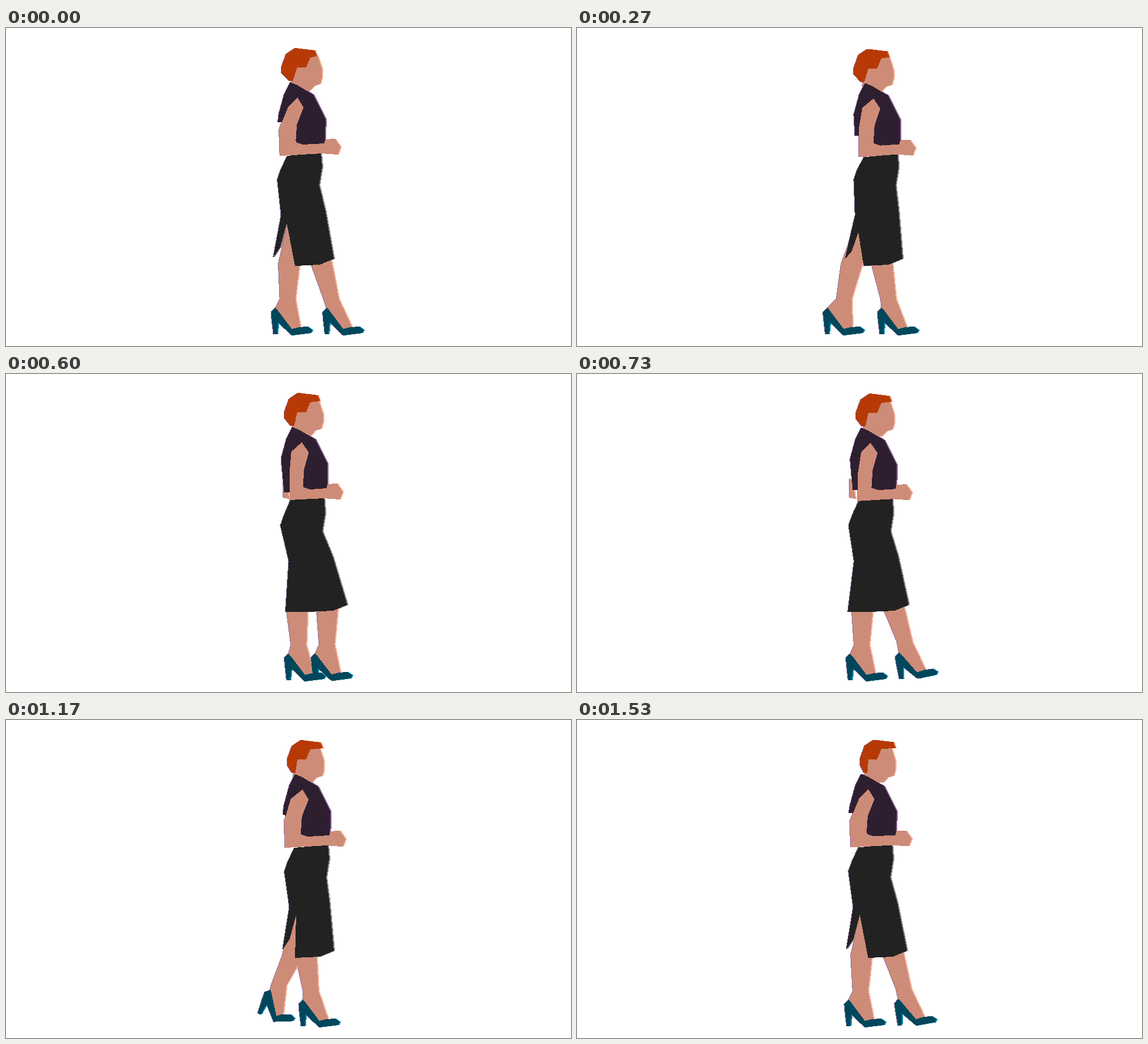
Recreate the animation shown at these times as an HTML page. Size 960x540 px, loop 1560 ms.

```html
<!DOCTYPE html>
<html lang="en">
<head>
<meta charset="utf-8">
<title>Walk cycle</title>
<style>
html, body { margin: 0; width: 100%; height: 100%; overflow: hidden; background: #fff; }
svg { display: block; width: 100vw; height: 100vh; }
</style>
</head>
<body>
<svg id="stage" viewBox="0 0 960 540" shape-rendering="crispEdges"></svg>
<script>
const LOOP = 1560;
const TAU = 2 * Math.PI;
const SKIN = ['#cd8c78', '#ffb9a2'];
const SHOE = ['#00475c', '#1a93b5'];
const SKIRT = ['#222222', '#8d8192'];
const VEST = ['#2e1f30', '#8a5f96'];
const HAIR = ['#b73a06', '#dc6a35'];

// Outlines around the ball of the foot.
const shoeShape = [[-28, -47], [-35, -40], [-34, -28], [-31, -2], [-25, -2], [-23, -22],
  [0, 0], [32, -4], [35, -9], [27, -15], [12, -14], [0, -11], [-24, -43]];
const footShape = [[-28, -46], [-1, -7], [15, -14]];

const clamp = v => Math.max(0, Math.min(1, v));
const mix = (a, b, u) => a + (b - a) * u;
const ease = u => u * u * (3 - 2 * u);
const wrap = p => p - Math.floor(p);

// One smooth rise and fall between phases a and b.
const bump = (p, a, b) => Math.sin(Math.PI * clamp((p - a) / (b - a)));

// Horizontal travel over a stride: glide back, wait, swing forward, settle.
function stride(p, { front, back, slide, curve, lift, land, reach }) {
  if (p < lift) return Math.max(back, front - slide * p - curve * p * p);
  if (p < land) return mix(back, reach, ease((p - lift) / (land - lift)));
  return mix(reach, front, (p - land) / (1 - land));
}
const ballPath = { front: 573, back: 453, slide: 150, curve: 50, lift: 0.735, land: 0.95, reach: 582 };
const kneePath = { front: 536, back: 467, slide: 100, curve: 20, lift: 0.68, land: 0.89, reach: 546 };

// Tilts a shape about the ball of the foot; the toes bend and follow only a little.
const place = (shape, x, y, tilt) => shape.map(([px, py]) => {
  const a = tilt * (tilt > 0 && px > 10 ? 0.2 : 1);
  return [x + px * Math.cos(a) - py * Math.sin(a), y + px * Math.sin(a) + py * Math.cos(a)];
});

function leg(p, hip) {
  const x = stride(p, ballPath), knee = stride(p, kneePath);
  const push = bump(p, 0.68, 0.86), strike = bump(p, 0.88, 1);
  const y = 522 - 10 * push - 6 * strike;
  const tilt = 0.46 * push - 0.11 * strike;
  const ankle = x - 5 + 0.42 * (knee - x), top = mix(knee, hip, 0.45);
  return {
    skin: [[top - 10, 325], [knee - 18, 400], [ankle - 13, y - 62],
      ...place(footShape, x, y, tilt),
      [ankle + 13, y - 62], [knee + 18, 400], [top + 10, 325]],
    shoe: place(shoeShape, x, y, tilt)
  };
}

// The hem follows both legs; the slit opens while the near leg trails.
function skirtShape(p, sway, bob) {
  const s = Math.sin(2 * TAU * p), c = Math.cos(2 * TAU * p);
  const front = 562 - 13 * s - 5 * Math.cos(4 * TAU * p);
  const back = 462 - 14 * s - 8 * c;
  const open = clamp(0.45 + 2 * Math.cos(TAU * (p - 0.95)));
  const hip = 467 + sway, belly = 538 + sway;
  return [
    [484 + sway, 217 + 1.5 * bob], [541 + sway, 212 + bob], [543 + sway, 236], [belly, 267],
    [mix(belly, front, 0.42), 310], [front, 392], [front - 24, 402], [front - 66, 404],
    [back + 23, 404 - 73 * open], [back + 12, 404 - 32 * open], [back, 404 - 14 * open],
    [(hip + back) / 2 + 10, 318], [mix(hip, back, 0.25) + 5, 287], [hip, 257], [hip + 6, 240]
  ];
}

function vestShape(swing, sway, bob) {
  const cuff = 177 + 24 * swing, x = 0.7 * sway;
  return [
    [487 + x, 92 + bob], [499 + x, 97 + bob], [526 + x, 113 + bob],
    [547 + x, 155 + bob], [546 + x, 199 + bob], [500, 205],
    [478 + 6 * swing, cuff], [469 + 4 * swing + x, cuff],
    [468 + x, 145 + bob], [477 + x, 112 + bob]
  ];
}

function armShape(swing, sway, bob) {
  const x = 0.7 * sway, bend = 500 + 5 * swing + x;
  return [
    [501 + 2 * swing + x, 118 + bob], [512 + 3 * swing + x, 135 + bob],
    [bend + 2, 164 + bob], [bend, 194 + bob], [bend + 12, 198 + bob],
    [545 + x, 196 + bob], [547 + x, 189 + bob], [563 + x, 188 + bob],
    [573 + x, 202 + bob], [568 + x, 215 + bob], [541 + x, 213 + bob],
    [475 + 7 * swing + x, 217 + 1.5 * bob], [474 + 8 * swing + x, 172 + bob],
    [483 + 2 * swing + x / 2, 134 + bob]
  ];
}

// The head turns a little: the outer edge of the hair drifts, the fringe stays.
function hairShape(turn, bob) {
  const outer = [[491, 34], [524, 38], [528, 48]], fringe = [[517, 50], [510, 67], [495, 67]];
  const nape = [[487, 90], [481, 90]], crown = [[468, 77], [468, 66], [476, 44]];
  const drift = (pts, d) => pts.map(([x, y]) => [x + d, y + bob]);
  return [...drift(outer, turn), ...drift(fringe, 0), ...drift(nape, turn / 2), ...drift(crown, turn)];
}

const faceShape = (dx, dy) => [[517, 46], [530, 48], [537, 70], [537, 84], [534, 95],
  [524, 98], [516, 107], [500, 106], [484, 98], [490, 66]].map(([x, y]) => [x + dx, y + dy]);

const svg = document.getElementById('stage');
function add(parent, tag, attrs = {}) {
  const el = document.createElementNS('http://www.w3.org/2000/svg', tag);
  for (const k in attrs) el.setAttribute(k, attrs[k]);
  return parent.appendChild(el);
}
const leftRim = add(svg, 'g', { transform: 'translate(-1 0)' });
const rightRim = add(svg, 'g', { transform: 'translate(2 0)' });
const main = add(svg, 'g');

function part([fill, rim]) {
  const copies = [
    add(leftRim, 'polygon', { fill: '#9070a0' }),
    add(rightRim, 'polygon', { fill: rim }),
    add(main, 'polygon', { fill })
  ];
  return pts => {
    const s = pts.map(([x, y]) => x.toFixed(1) + ',' + y.toFixed(1)).join(' ');
    copies.forEach(c => c.setAttribute('points', s));
  };
}

const farSkin = part(SKIN), farShoe = part(SHOE);
const nearSkin = part(SKIN), nearShoe = part(SHOE);
const skirt = part(SKIRT), elbow = part(SKIN), face = part(SKIN);
const vest = part(VEST), hair = part(HAIR), arm = part(SKIN);

function draw(t) {
  const p = t / LOOP;
  const sway = -6 * Math.cos(2 * TAU * p), bob = 2 * Math.sin(2 * TAU * p);
  const swing = Math.cos(TAU * (p - 0.38)), turn = 13 * p;
  const far = leg(p, 507 + sway), near = leg(wrap(p + 0.5), 507 + sway);
  farSkin(far.skin);
  farShoe(far.shoe);
  nearSkin(near.skin);
  nearShoe(near.shoe);
  skirt(skirtShape(p, sway, bob));

  const ex = 482 - 19 * bump(p, 0.33, 0.61);
  elbow([[ex, 178], [ex + 6, 180], [ex + 10, 212], [ex, 210]]);
  face(faceShape(turn / 3, bob));
  vest(vestShape(swing, sway, bob));
  hair(hairShape(turn, bob));
  arm(armShape(swing, sway, bob));
}

// Three pictures every 100 ms.
function step(t) {
  const r = t % 100;
  return t - r + (r < 30 ? 0 : r < 70 ? 30 : 70);
}

const start = performance.now();
function tick() {
  draw(step((performance.now() - start) % LOOP));
  requestAnimationFrame(tick);
}
tick();
</script>
</body>
</html>
```
